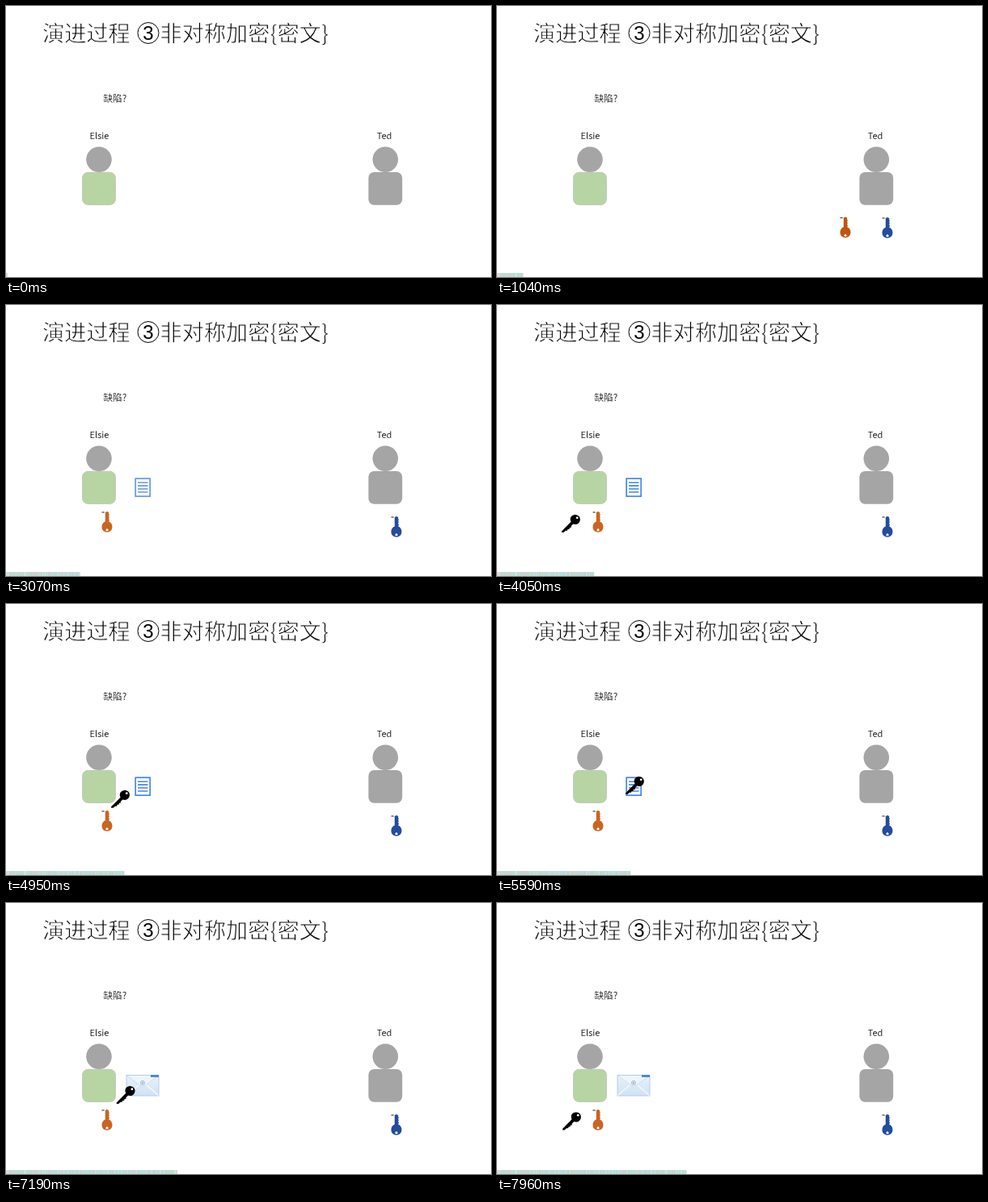
An HTML page that plays this animation: 600x336 px, repeating every 8 s.

```html
<!DOCTYPE html>
<html lang="zh-CN">
<head>
<meta charset="utf-8">
<title>非对称加密</title>
<style>
  html, body { margin: 0; width: 100%; height: 100%; overflow: hidden; background: #fff; }
  svg { display: block; width: 100%; height: 100%; }
  text { font-family: "Noto Sans CJK SC", "Noto Sans CJK", sans-serif; fill: #000; }
  /* A white outline on top thins the strokes to a light weight */
  .title { font-size: 27.2px; font-weight: 300; stroke: #fff; stroke-width: .8; }
  .digit { font: 24px "Liberation Sans", sans-serif; text-anchor: middle; }
  .label { font-size: 11px; text-anchor: middle; stroke: #fff; stroke-width: .15; }
  .note { font-size: 11.7px; stroke: #fff; stroke-width: .2; }
</style>
</head>
<body>
<svg viewBox="0 0 600 336">
  <defs>
    <g id="key">
      <path fill-rule="evenodd" d="M-2.2 1 L0 0 L2.2 1 V3.3 L3 4.4 L2 5.8 L3 7.3 L2 8.8 L3 10.3 L2.2 12.5
        C7.7 14.5 7.9 23 3 25 C1 26 -1 26 -3 25 C-7.9 23 -7.7 14.5 -2.2 12.5 Z
        M0 20.8 L-2 23.2 L0 24.6 L2 23.2 Z"/>
      <path d="M-6.5 1h3.2" stroke="#444" stroke-width="1.2"/>
    </g>
    <linearGradient id="paper" x2="0" y2="1">
      <stop offset="0" stop-color="#e9f2fb"/>
      <stop offset="1" stop-color="#cfe2f3"/>
    </linearGradient>
    <clipPath id="wipe"><rect id="wipeArea" x="148" y="212" width="0" height="29"/></clipPath>
    <clipPath id="progress"><rect id="progressArea" y="331" width="2" height="5"/></clipPath>
  </defs>

  <text class="title" x="45" y="43.5">演进过程</text>
  <circle cx="176" cy="33.5" r="13" fill="none" stroke="#000" stroke-width="1"/>
  <text class="digit" x="176" y="42">3</text>
  <text class="title" x="190.5" y="43.5">非对称加密{密文}</text>
  <text class="note" x="120.4" y="119">缺陷?</text>

  <text class="label" x="115.5" y="165">Elsie</text>
  <circle cx="115" cy="190.3" r="15.8" fill="#a5a5a5"/>
  <rect x="94.5" y="206.3" width="41" height="40.2" rx="7" fill="#b7d5a3" stroke="#b9c4b2" stroke-width=".8"/>

  <text class="label" x="468" y="165">Ted</text>
  <circle cx="469.3" cy="190.3" r="15.8" fill="#a5a5a5"/>
  <rect x="448.4" y="206" width="41.8" height="40.8" rx="7" fill="#a5a5a5"/>

  <use id="blueKey" href="#key" x="483" y="262" fill="#234c9c"/>
  <use id="orangeKey" href="#key"/>

  <g id="page" fill="#fff" stroke="#4485e8">
    <rect x="160.2" y="215.2" width="18" height="22" stroke-width="1.7"/>
    <path d="M163 220.2h12.5m-12.5 3.9h12.5m-12.5 3.9h12.5m-12.5 4h12.5" stroke-width="1.6"/>
  </g>

  <g clip-path="url(#wipe)">
    <rect x="149" y="213.5" width="40" height="25.5" fill="url(#paper)" stroke="#b4cce5"/>
    <path d="M149.5 238.5 L165 225 M188.5 238.5 L173 225" stroke="#f8fbfe" stroke-width="1.2"/>
    <path d="M149.5 214 L166 226.5 Q169 228.5 172 226.5 L188.5 214" fill="#edf5fc" stroke="#c3d7ea" stroke-width=".8"/>
    <circle cx="169" cy="223" r="2.6" fill="#dce6ee" stroke="#9fb3c4" stroke-width=".8"/>
    <circle cx="169" cy="223" r=".9" fill="#8ea5b8"/>
    <rect x="179" y="213" width="10" height="3" fill="#4a8cc9"/>
  </g>

  <g id="blackKey">
    <path d="M80 280.5 L91.5 268.8 C88.8 263 93.5 259.3 98 260.2 C102.5 260.8 104 265.5 102 269
      C100 272.3 96.5 272.6 94.3 271.6 L91.7 274.2 L91.7 276 L89.8 276 L89.5 278 L87.5 278
      L87 279.8 L85 279.8 L82.5 282 H80 Z"/>
    <circle cx="99.2" cy="263.8" r="1.4" fill="#fff"/>
  </g>

  <g id="stripes" clip-path="url(#progress)"></g>
</svg>
<script>
const LOOP = 8000;
const $ = id => document.getElementById(id);
const clamp = v => Math.min(1, Math.max(0, v));
const ramp = (t, start, duration) => clamp((t - start) / duration);
const glide = (t, start, duration) => (1 - Math.cos(Math.PI * ramp(t, start, duration))) / 2;
const move = (id, x, y) => $(id).setAttribute("transform", `translate(${x} ${y})`);
const fade = (id, opacity) => $(id).setAttribute("opacity", opacity);

// Pastel stripes revealed by the progress bar
const palette = ["#b2e2da", "#d3cfd3", "#c0e2c6", "#c2d3d4", "#b5dde2", "#cbe6dc"];
let seed = 7;
for (let x = 0; x < 240; x++) {
  seed = (seed * 16807) % 2147483647;
  const stripe = document.createElementNS("http://www.w3.org/2000/svg", "rect");
  const attributes = {
    x, y: 331, width: 1.05, height: 5,
    fill: x < 3 ? "#d8dcdc" : palette[seed % palette.length]
  };
  for (const name in attributes) stripe.setAttribute(name, attributes[name]);
  $("stripes").append(stripe);
}

function draw(t) {
  const keysIn = ramp(t, 70, 500);
  fade("blueKey", keysIn);
  fade("orangeKey", keysIn);
  const sent = glide(t, 770, 1625);
  move("orangeKey", 453 - 328 * sent, 262 - 6 * sent);
  $("orangeKey").setAttribute("fill", sent < 1 ? "#c0560f" : "#ca6421");

  fade("page", ramp(t, 2650, 500));

  fade("blackKey", ramp(t, 3480, 500));
  const used = glide(t, 4130, 1400) - glide(t, 6710, 1350);
  move("blackKey", 79 * used, -46 * used);

  $("wipeArea").setAttribute("width", 42 * ramp(t, 5760, 500));
  $("progressArea").setAttribute("width", 2 + 0.0292 * t);
}

function tick() {
  draw(performance.now() % LOOP);
  requestAnimationFrame(tick);
}
tick();
</script>
</body>
</html>
```
